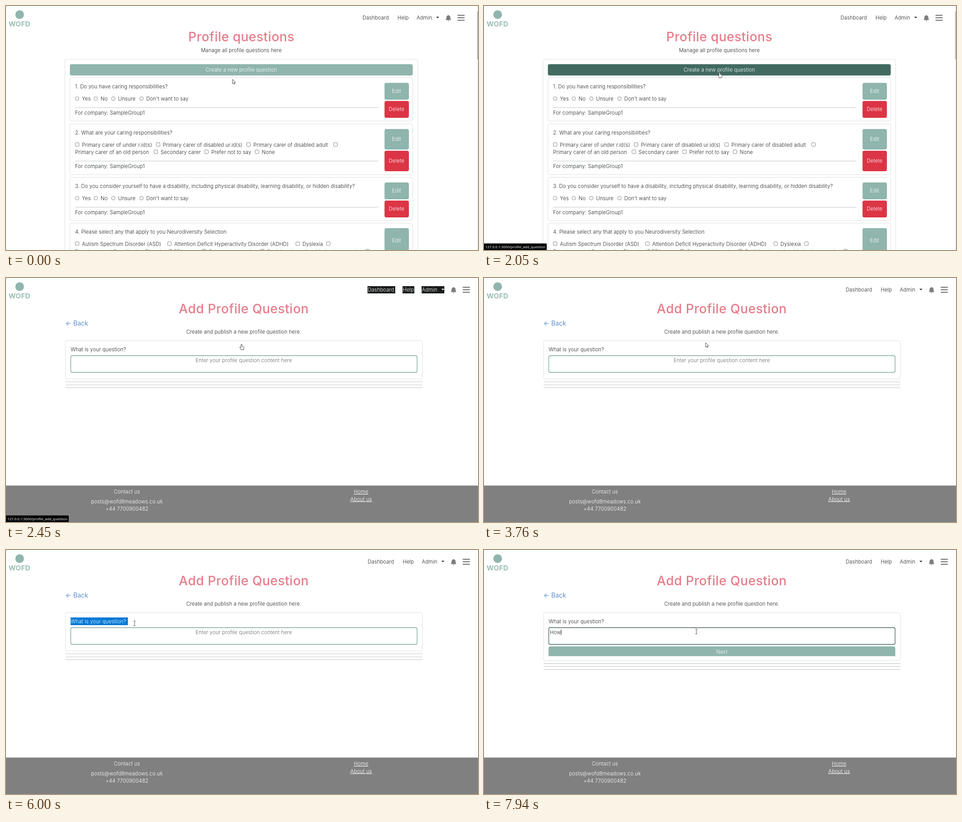
These frames come from a looping animation (1038x539 px, 8 s). An HTML page:

```html
<!DOCTYPE html>
<html lang="en">
<head>
<meta charset="utf-8">
<title>Profile questions</title>
<style>
html, body { margin: 0; width: 100%; height: 100%; overflow: hidden; background: #fff; }
svg {
  display: block; width: 1038px; height: 539px;
  --bg: #fff; --ink: #212529; --title: #e67c8a; --link: #2f6bc0; --edge: #dcdfe0; --rule: #c4c6c7;
  --box: #78a59b; --hint: #616b6b; --foot: #808080; --bars: #3b3d3f; --sage: #8fb5ad;
  font: 350 11.2px Inter, sans-serif; letter-spacing: .15px;
}
svg.dark {
  --bg: #181a1b; --ink: #e8e6e3; --title: #e8e6e3; --link: #e8e6e3; --edge: #5c5f5a; --rule: #83827b;
  --box: #77766e; --hint: #43635b; --foot: #181a1b; --bars: #26292a;
}
text { fill: var(--ink); white-space: pre; }
.title { font-size: 28px; font-weight: 450; letter-spacing: .5px; fill: var(--title); }
.mid { text-anchor: middle; }
.light { fill: #fff; }
.brand { font-size: 15px; font-weight: 600; letter-spacing: .3px; fill: var(--sage); }
.back { font-size: 14px; fill: var(--link); }
.hint { fill: var(--hint); }
.under { text-decoration: underline; }
.url { font: 7.8px "Open Sans", sans-serif; letter-spacing: 0; }
.card { fill: none; stroke: var(--edge); }
.rule { stroke: var(--rule); }
.tick { fill: #fff; stroke: #767676; stroke-width: .9; }
.sage { fill: var(--sage); }
.red { fill: #dc3545; }
#nav.flash text, #nav.flash .caret { fill: #fff; }
.caret { fill: var(--ink); }
</style>
</head>
<body>
<svg id="stage" viewBox="0 0 1038 539" xmlns="http://www.w3.org/2000/svg"></svg>
<script>
const LOOP = 8000;
const stage = document.getElementById('stage');
const $ = id => document.getElementById(id);

// Markup helpers
const text = (x, y, s, cls = '', more = '') => `<text x="${x}" y="${y}" class="${cls}" ${more}>${s}</text>`;
const mid = (x, y, s, cls = '', more = '') => text(x, y, s, 'mid ' + cls, more);
const rect = (x, y, w, h, cls, r = 0, more = '') =>
  `<rect x="${x}" y="${y}" width="${w}" height="${h}" rx="${r}" class="${cls}" ${more}/>`;
const rule = (x1, x2, y, more = '') => `<path d="M${x1} ${y}H${x2}" class="rule" ${more}/>`;
const radio = (x, y) => `<circle cx="${x}" cy="${y}" r="4" class="tick"/>`;
const check = (x, y) => rect(x - 4, y - 4, 8, 8, 'tick', 1.4);

const button = (y, h, label, cls) =>
  rect(832.4, y, 53.6, h, cls, 4) + mid(859, y + h / 2 + 4, label, 'light');

function card(y, h, question, body, buttonH) {
  return rect(140.5, y, 754, h, 'card', 4) + text(152, y + 23.5, question) + body +
    button(y + 11.3, buttonH, 'Edit', 'sage') +
    button(y + 13.9 + buttonH, buttonH, 'Delete', 'red');
}
const company = y => rule(152, 819, y - 15.5) + text(152, y, 'For company: SampleGroup1');
const choices = y => [[156.5, 'Yes'], [197.5, 'No'], [236, 'Unsure'], [298, "Don't want to say"]]
  .map(([x, s]) => radio(x, y - 4.5) + text(x + 10.5, y, s)).join('');
const checks = (y, list) => list
  .map(([x, s]) => check(x, y - 5) + text(x + 10.5, y, s)).join('');

const nav = `<g id="nav">
  <g id="plates" fill="#181a1b">${rect(783.5, 18, 61, 16, '')}${rect(860.5, 18, 26, 16, '')}${rect(902.5, 18, 50, 16, '')}</g>
  ${text(784, 30, 'Dashboard')}${text(861, 30, 'Help')}${text(903, 30, 'Admin')}
  <path class="caret" d="M946 23.7h6.6l-3.3 3.4z"/>
  <path fill="#7b7d7e" d="M972.8 20c.8 0 1.1.5 1.1 1.1 2.2.5 3.3 2.2 3.3 4.3 0 2.8.6 4.3 1.7 5.6h-12.2c1.1-1.3 1.7-2.8 1.7-5.6 0-2.1 1.1-3.8 3.3-4.3 0-.6.3-1.1 1.1-1.1zM971.2 31.8h3.2a1.6 1.6 0 0 1-3.2 0z"/>
  <path d="M993 20.5h15.5M993 26h15.5M993 31.5h15.5" stroke="var(--bars)" stroke-width="1.4"/>
</g>`;

const listPage = `<g id="list">
  ${mid(517.5, 77.5, 'Profile questions', 'title')}${mid(517.5, 102, 'Manage all profile questions here')}
  ${rect(129.5, 118, 776, 500, 'card', 4)}
  ${rect(140.5, 128.5, 754, 25, '', 4, 'id="create"')}${mid(517.5, 145, 'Create a new profile question', 'light')}
  ${card(158.5, 95.5, '1. Do you have caring responsibilities?', choices(209) + company(240), 37.3)}
  ${card(260.5, 112, '2. What are your caring responsibilities?',
    checks(311, [[156.5, 'Primary carer of under r.id(s)'], [334.5, 'Primary carer of disabled ur.id(s)'],
      [533.5, 'Primary carer of disabled adult'], [724.5, '']]) +
    text(152, 327, 'Primary carer of an old person') +
    checks(327, [[329.5, 'Secondary carer'], [441, 'Prefer not to say'], [552, 'None']]) + company(358), 45.3)}
  ${card(378.5, 95.5, '3. Do you consider yourself to have a disability, including physical disability, learning disability, or hidden disability?',
    choices(429) + company(460), 37.3)}
  ${card(479.5, 130, '4. Please select any that apply to you Neurodiversity Selection',
    checks(530, [[156.5, 'Autism Spectrum Disorder (ASD)'], [359.5, 'Attention Deficit Hyperactivity Disorder (ADHD)'],
      [641.5, 'Dyslexia'], [709, '']]) +
    text(152, 546.5, 'Developmental Coordination Disorder (DCD)') +
    checks(546.5, [[435.5, 'Sensory processing'], [563.5, 'Social and emotional behaviour need'], [795, '']]), 54)}
  ${rect(1035.5, 0, 2.5, 539, '', 0, 'fill="#f3f3f3"')}${rect(1036, 12, 2, 106, '', 0, 'fill="#b9b9b9"')}
</g>`;

const ask = cls => text(142.3, 161.5, 'What is your question?', cls);
const formPage = `<g id="form">
  ${mid(523, 77.5, 'Add Profile Question', 'title')}
  ${text(131, 105, '←', 'back')}${text(148, 105, 'Back', 'back')}
  ${mid(523, 123, 'Create and publish a new profile question here.')}
  ${rect(131, 138.5, 784.5, 85, 'card', 4, 'id="panel"')}
  ${ask()}
  <clipPath id="selClip">${rect(142, 149, 0, 17, '', 0, 'id="selArea"')}</clipPath>
  <g clip-path="url(#selClip)">${rect(142, 149, 126, 17, '', 0, 'fill="#0078d7"')}${ask('light')}</g>
  ${rect(142.5, 171.5, 761.5, 37, '', 3, 'id="field" fill="none" stroke-width="1.3"')}
  ${mid(523, 185.5, 'Enter your profile question content here', 'hint', 'id="hint"')}
  ${text(145, 185.5, '', '', 'id="typed"')}
  ${rect(145, 175.5, 0.9, 12.5, '', 0, 'id="cursorBar" fill="#111"')}
  <clipPath id="nextClip">${rect(142, 213, 763, 0, '', 0, 'id="nextArea"')}</clipPath>
  <g clip-path="url(#nextClip)">${rect(142, 213, 762.5, 25, 'sage', 4)}${mid(523, 229, 'Next', 'light')}</g>
  <g id="rules">${[229.5, 236, 242.5].map(y => rule(131, 915.5, y, 'stroke-width="1.2"')).join('')}</g>
  ${rect(0, 458.5, 1038, 81, '', 0, 'fill="var(--foot)"')}
  ${mid(266, 476, 'Contact us', 'light')}${mid(266, 497.5, 'posts@wofd8meadows.co.uk', 'light')}${mid(266, 514, '+44 7700900482', 'light')}
  ${mid(781, 476, 'Home', 'light under')}${mid(781, 492.5, 'About us', 'light under')}
</g>`;

const pointers = `<g id="pointer" stroke="#222" stroke-width=".8" fill="#fff" stroke-linejoin="round">
  <path id="arrow" d="M0 0V9.6L2.2 7.6 3.7 10.9 5.3 10.2 3.9 7H6.7Z"/>
  <path id="hand" d="M-1.2.8Q0-.6 1.2.8V4.7L4.5 5.4Q5.6 5.8 5.5 7L4.8 10.2V12.5H-1.2V11L-4 7.5Q-4.3 6.3-3 6.4L-1.2 7.9Z"/>
  <path id="beam" d="M-2.4-5.3H-.7L0-4.7 .7-5.3H2.4M-2.4 5.3H-.7L0 4.7 .7 5.3H2.4M0-4.7V4.7" fill="none"/>
</g>`;

stage.innerHTML = rect(0, 0, 1038, 539, '', 0, 'fill="var(--bg)"') +
  '<circle cx="30" cy="19" r="9.5" class="sage"/>' + text(6, 45, 'WOFD', 'brand') +
  listPage + formPage + nav +
  `<g id="status">${rect(-4, 524.5, 142, 20, '', 2, 'fill="#040505"')}${text(3, 534.7, '127.0.0.1:3000/profile_add_question', 'url light')}</g>` +
  pointers;

// Pointer moves: start, end, number of steps, target
const START = [498, 162];
const MOVES = [
  [90, 660, 8, 514, 148], [810, 1000, 3, 518, 146], [3760, 4060, 5, 223, 117],
  [4320, 4940, 9, 146, 155], [5110, 5580, 7, 272, 161], [6000, 6470, 7, 467, 180]
];
const TYPING = [[7690, 'H'], [7850, 'Ho'], [7940, 'How']];

// Share of a stepped change done at time t, 0 to 1
function stepped(t, from, to, n) {
  if (t < from) return 0;
  return Math.min(n, Math.floor((t - from) / (to - from) * (n - 1) + 1e-6) + 1) / n;
}
const smooth = p => p * p * (3 - 2 * p);
const show = (id, on) => { $(id).style.display = on ? '' : 'none'; };
const set = (id, name, value) => $(id).setAttribute(name, value);

function pointerAt(t) {
  let [x, y] = START;
  for (const [from, to, n, tx, ty] of MOVES) {
    if (t < from) break;
    const p = smooth(stepped(t, from, to, n));
    x += (tx - x) * p;
    y += (ty - y) * p;
  }
  return [x, y];
}

function createColor(t, y) {
  if (t >= 1980 && t < 2050) return '#3b6057';
  if (y > 153) return '#8fb5ad';
  return y > 151 ? '#688f86' : '#426a61';
}

function draw(t) {
  const [x, y] = pointerAt(t);
  const form = t >= 2380, dark = form && t < 2450, flash = form && t < 2540;
  stage.classList.toggle('dark', dark);
  show('list', !form);
  show('form', form);
  set('nav', 'transform', `translate(${form ? 11.5 : 0})`);
  $('nav').classList.toggle('flash', flash);
  show('plates', flash);
  set('create', 'fill', createColor(t, y));
  set('status', 'opacity', t < 2540 ? stepped(t, 810, 1000, 3) : t < 2620 ? 0.5 : 0);

  const kind = t < 3760 ? (y < 153 ? 'hand' : 'arrow') : t >= 4320 && y >= 150 ? 'beam' : 'arrow';
  for (const id of ['arrow', 'hand', 'beam']) show(id, id === kind);
  set('pointer', 'transform', `translate(${x} ${y})`);

  const focus = t >= 6470;
  set('selArea', 'width', t >= 5110 && !focus ? Math.min(126, x - 142) : 0);
  set('field', 'stroke', focus ? '#3f635b' : 'var(--box)');

  let typed = '';
  for (const [at, s] of TYPING) if (t >= at) typed = s;
  $('typed').textContent = typed;
  show('hint', !typed);
  show('cursorBar', focus && (t < 7040 || t >= 7540));
  set('cursorBar', 'x', typed ? 145 + $('typed').getComputedTextLength() : 145);

  // The Next button slides open
  const slide = [7690, 7770, 7850, 7940].filter(at => t >= at).pop() || 7690;
  const grow = 31 * (0.5 - Math.cos((slide - 7690) / 400 * Math.PI) / 2);
  const drop = dark ? 1 : grow;
  set('nextArea', 'height', grow);
  set('panel', 'height', 84.5 + drop);
  set('rules', 'transform', `translate(0 ${drop})`);
}

function frame() {
  draw(performance.now() % LOOP);
  requestAnimationFrame(frame);
}
frame();
</script>
</body>
</html>
```
